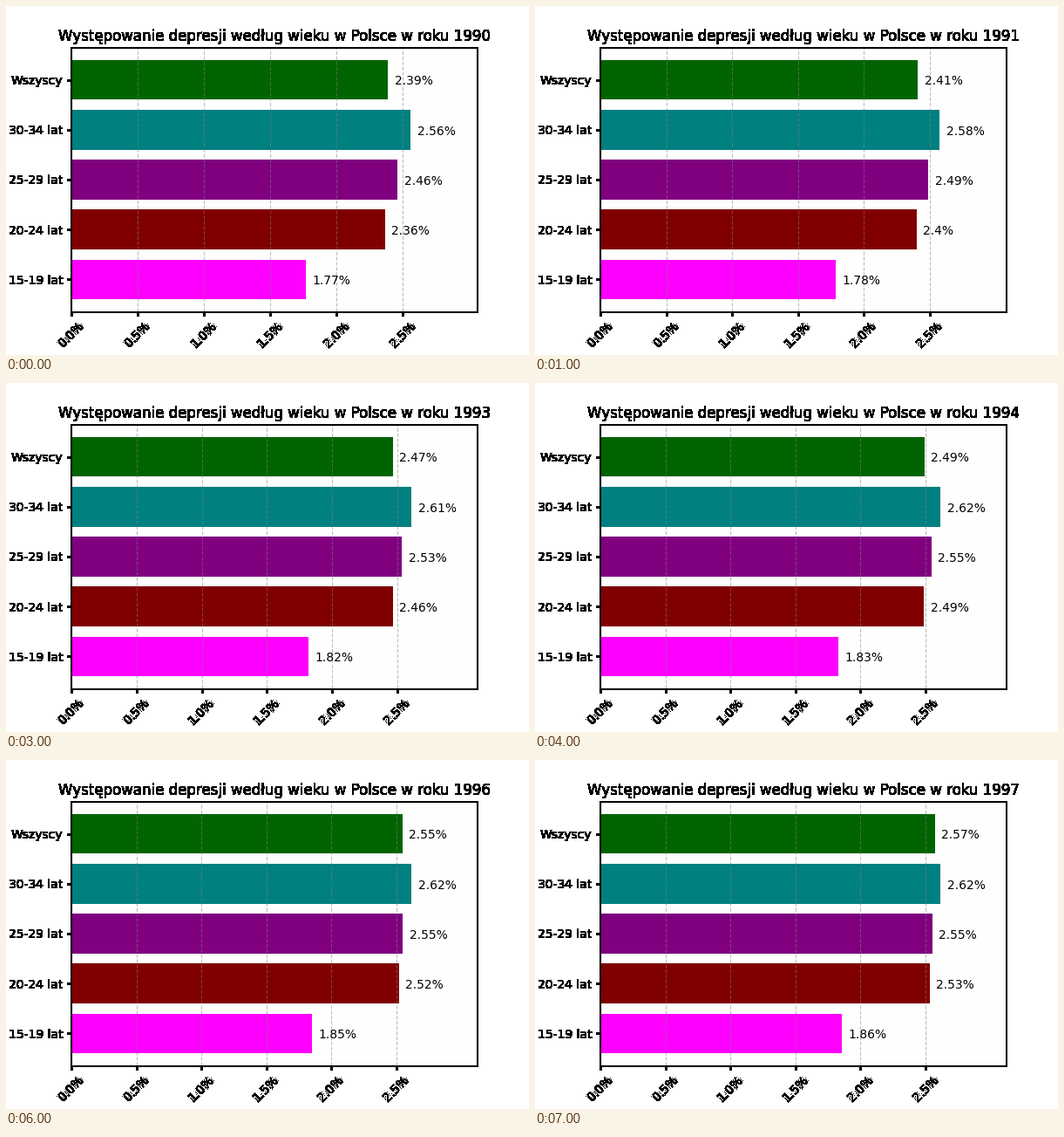
Animation, 600 px wide and 400 px high, one loop 8 s. Source, as a matplotlib script:

```python
import numpy as np
import matplotlib.pyplot as plt
from matplotlib.animation import FuncAnimation

plt.rcParams["font.family"] = "DejaVu Sans"

FIRST_YEAR = 1990
YEARS = 8
KEY_YEARS = [0, 2, 5, 7]

# Group, bar colour and its rate (percent) in each key year.
GROUPS = [
    ("15-19 lat", "magenta", (1.7674, 1.8017, 1.8426, 1.8555)),
    ("20-24 lat", "maroon", (2.364, 2.436, 2.508, 2.532)),
    ("25-29 lat", "purple", (2.4575, 2.518, 2.5505, 2.553)),
    ("30-34 lat", "teal", (2.556, 2.597, 2.6215, 2.6157)),
    ("Wszyscy", "darkgreen", (2.388, 2.4374, 2.5215, 2.570)),
]
NAMES, COLORS, KEY_RATES = zip(*GROUPS)

# Each group follows a smooth cubic through its key years.
TREND = np.polyfit(KEY_YEARS, np.transpose(KEY_RATES), 3)


def rates_in(year):
    return np.polyval(TREND, float(year))


def harden(img, dpi):
    """Make every touched pixel opaque, giving crisp text outside the plot."""
    img[..., 3] = img[..., 3] > 0
    return img, 0, 0


fig, ax = plt.subplots(figsize=(6, 4), dpi=100, facecolor="white")
fig.subplots_adjust(left=0.125, right=0.9, bottom=0.125, top=0.88)
ax.set_agg_filter(harden)


def draw_year(year):
    rates = rates_in(year)
    rows = np.arange(len(NAMES))
    ax.clear()
    ax.set_facecolor("#fefefe")
    ax.barh(rows, rates, color=COLORS)
    for row, rate in zip(rows, rates):
        ax.text(rate + 0.05, row - 0.1, f"{round(float(rate), 2)}%")

    ticks = np.arange(0, 2.6, 0.5)
    ax.set_xlim(0, rates.max() + 0.5)
    ax.set_xticks(ticks, [f"{t:.1f}%" for t in ticks], rotation=45)
    ax.set_yticks(rows, NAMES)
    ax.grid(axis="x", linestyle="--", color="gray", alpha=0.5)
    ax.set_title(f"Występowanie depresji według wieku w Polsce w roku {FIRST_YEAR + year}")


anim = FuncAnimation(fig, draw_year, frames=YEARS, interval=1000,
                     repeat=True, repeat_delay=0, blit=False)
plt.show()
```
